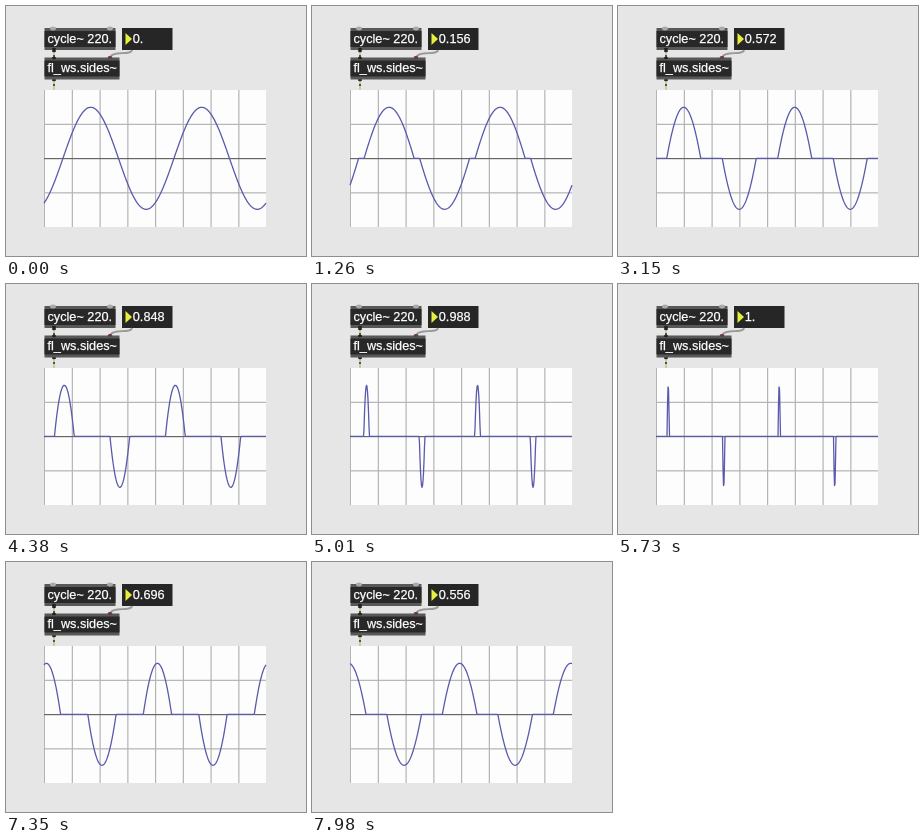
Animation of 300x250 px, one loop 8000 ms. Source, as an HTML page with a canvas:

```html
<!DOCTYPE html>
<html lang="en">
<head>
<meta charset="utf-8">
<title>Waveshaper patch</title>
<style>
  html, body { margin: 0; width: 100%; height: 100%; overflow: hidden; background: #e6e6e6; }
  canvas { display: block; }
</style>
</head>
<body>
<canvas width="300" height="250"></canvas>
<script>
const ctx = document.querySelector('canvas').getContext('2d');
const LOOP = 8000, STEP = 30;
const SCOPE = { x: 38, y: 84, w: 222, h: 137 };
const MID = 152.3, AMPLITUDE = 51, PERIOD = 111;

function rect(x, y, w, h, color) {
  ctx.fillStyle = color;
  ctx.fillRect(x, y, w, h);
}

function label(text, x, y) {
  ctx.font = '12.7px "Liberation Sans", Arial, sans-serif';
  ctx.fillStyle = ctx.strokeStyle = '#fff';
  ctx.lineWidth = 0.25;
  ctx.fillText(text, x, y);
  ctx.strokeText(text, x, y);
}

function port(x, y, r, color) {
  ctx.fillStyle = color;
  ctx.beginPath();
  ctx.ellipse(x, y, r, r * 0.65, 0, 0, Math.PI * 2);
  ctx.fill();
}

function objectBox(text, y, w) {
  rect(38.5, y, w, 22, '#585858');
  rect(38.5, y + 3, w, 16, '#282828');
  label(text, 41.5, y + 14.5);
}

function signalCord(y1, y2) {
  rect(47, y1, 2, y2 - y1, '#cbcb9c');
  port(48, y1 + 2, 2, '#222');
  rect(47, y1 + 6, 2, 2, '#55553c');
}

// A slow ramp up, a hold, then a ramp down in ticks of 0.004.
function sidesAt(t) {
  const ticks = start => Math.min(250, Math.max(0, Math.floor((t - start) / 18.03)));
  return (ticks(555) - ticks(5970)) / 250;
}

function formatNumber(v) {
  const text = String(+v.toFixed(3));
  return text.includes('.') ? text : text + '.';
}

function drawPatch(value) {
  signalCord(43, 52);
  signalCord(72, 84);
  objectBox('cycle~ 220.', 22, 71);
  objectBox('fl_ws.sides~', 51.5, 75);

  rect(116, 22, 50.5, 22, '#262626');
  ctx.fillStyle = '#e6f03c';
  ctx.beginPath();
  ctx.moveTo(119.5, 27);
  ctx.lineTo(126, 33);
  ctx.lineTo(119.5, 39);
  ctx.fill();
  label(formatNumber(value), 126.8, 36.5);

  ctx.strokeStyle = '#999';
  ctx.lineWidth = 1.8;
  ctx.beginPath();
  ctx.moveTo(126, 44);
  ctx.bezierCurveTo(125, 50, 105, 44, 104, 52);
  ctx.stroke();

  port(47, 22.5, 3, '#aaa');
  port(104, 22.5, 3, '#aaa');
  port(104, 51.5, 2.2, '#6e3840');
  port(48, 43, 2, '#222');
  port(48, 52, 2, '#222');
}

function drawScope(value, t) {
  const { x, y, w, h } = SCOPE;
  rect(x, y, w, h, '#fdfdfd');
  rect(x, y, 1, h, '#b4b4b4');
  for (let i = 1; i < 8; i++) rect(x + i * w / 8, y, 1.2, h, '#b4b4b4');
  for (let i = 1; i < 4; i++) {
    rect(x, y - 0.5 + i * h / 4, w, 1.2, i === 2 ? '#666' : '#b4b4b4');
  }

  const peak = 84.7 - t * 0.00602;
  const threshold = Math.min(value, 0.998);
  ctx.strokeStyle = '#5a5aac';
  ctx.lineWidth = 1.3;
  ctx.lineJoin = 'round';
  ctx.beginPath();
  for (let px = x; px <= x + w; px += 0.5) {
    const wave = Math.cos((px - peak) / PERIOD * Math.PI * 2);
    const shaped = Math.sign(wave) * Math.max(0, Math.abs(wave) - threshold) / (1 - threshold);
    ctx.lineTo(px, MID - AMPLITUDE * shaped);
  }
  ctx.stroke();
}

function draw(now) {
  const t = Math.floor(now % LOOP / STEP) * STEP;
  const value = sidesAt(t);
  rect(0, 0, 300, 250, '#e6e6e6');
  drawScope(value, t);
  drawPatch(value);
}

function frame() {
  draw(performance.now());
  requestAnimationFrame(frame);
}
frame();
</script>
</body>
</html>
```
